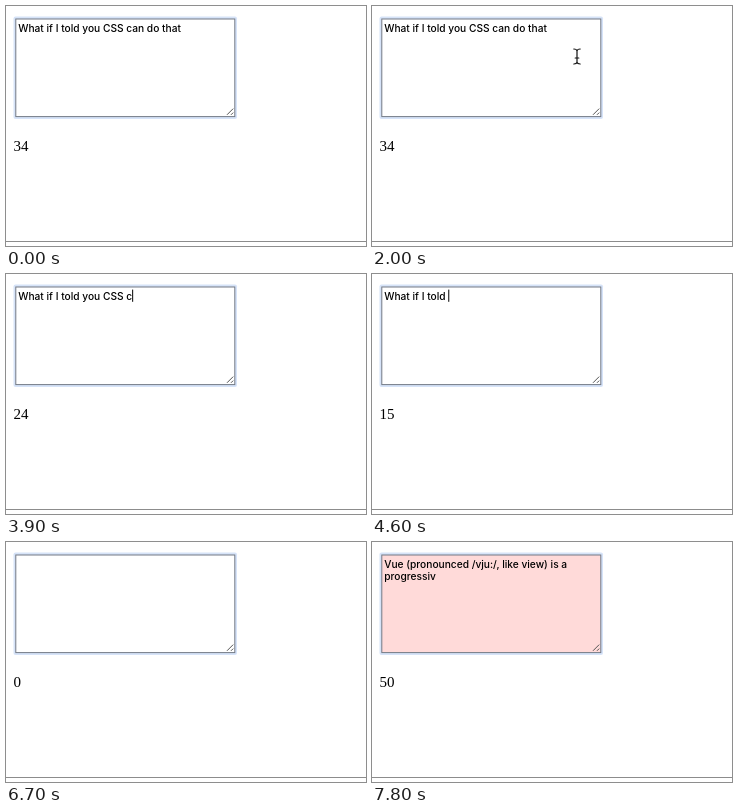
Write an HTML page that moves like this. It is 360 by 240 pixels and loops after 8000 ms.

```html
<!DOCTYPE html>
<html lang="en">
<head>
<meta charset="utf-8">
<title>Character counter</title>
<style>
  html, body { margin: 0; width: 100%; height: 100%; overflow: hidden; background: #fff; }
  svg { display: block; width: 360px; height: 240px; }
  .typed { font: 500 10.2px Inter, Roboto, sans-serif; white-space: pre; }
  .count { font: 15px "Liberation Serif", "Times New Roman", serif; }
  .grip { fill: none; stroke: #555; stroke-width: 1; }
  .beam { fill: none; stroke-linecap: round; }
</style>
</head>
<body>
<svg viewBox="0 0 360 240">
  <rect x="7.5" y="10.5" width="223.5" height="102.5" rx="2" fill="#d6e3f8"/>
  <rect id="field" x="9.8" y="13" width="219" height="97.6" fill="#fff" stroke="#747a85"/>
  <path class="grip" d="M221 108.8 227.2 102.6M225 108.8 227.2 106.6"/>
  <text id="line1" class="typed" x="12.2" y="26" xml:space="preserve"></text>
  <text id="line2" class="typed" x="12.2" y="38.2" xml:space="preserve"></text>
  <rect id="caret" width="1" height="12.2"/>
  <text id="count" class="count" x="7.5" y="145"></text>
  <g id="mouse" class="beam">
    <path id="beam" d="M-3.2-7Q-.3-7 0-5Q.3-7 3.2-7M0-5V6M-3.2 8Q-.3 8 0 6Q.3 8 3.2 8M-1.8 2H1.8" stroke="#fff" stroke-width="2.6"/>
    <use href="#beam"/>
    <path d="M-3.2-7Q-.3-7 0-5Q.3-7 3.2-7M0-5V6M-3.2 8Q-.3 8 0 6Q.3 8 3.2 8M-1.8 2H1.8" stroke="#111" stroke-width="1.2"/>
  </g>
  <path d="M0 235.5H360" stroke="#8c8c8c"/>
</svg>
<script>
  const LOOP = 8000;
  const FIRST = "What if I told you CSS can do that";
  const PASTED = ["Vue (pronounced /vju:/, like view) is a ", "progressiv"];
  const PASTE_AT = 7100;
  const REPEAT_MS = 1000 / 12;

  // Single key presses, before the key is held down
  const PRESSES = [2200, 2400, 2600, 2800, 2900, 3000, 3100, 3200];
  const HOLD_AT = 3765;

  const $ = id => document.getElementById(id);
  const [field, line1, line2, caret, count, mouse] =
    ["field", "line1", "line2", "caret", "count", "mouse"].map($);

  function textAt(t) {
    if (t >= PASTE_AT) return PASTED;
    let gone = PRESSES.filter(p => t >= p).length;
    if (t >= HOLD_AT) gone += 1 + Math.floor((t - HOLD_AT) / REPEAT_MS);
    return [FIRST.slice(0, Math.max(0, FIRST.length - gone)), ""];
  }

  function caretOn(t) {
    if (t < 2200) return Math.floor(t / 500) % 2 === 1;
    return t < 6700 || (t >= PASTE_AT && t < 7600);
  }

  function moveMouse(t) {
    const p = Math.min(1, Math.max(0, (t - 450) / 550));
    const e = p * p * (3 - 2 * p);
    mouse.setAttribute("transform", `translate(${46 + 159 * e} ${97 - 47 * e})`);
    mouse.style.display = t >= 500 && t < 2200 ? "" : "none";
  }

  function render(t) {
    const [a, b] = textAt(t);
    const last = b ? line2 : line1;
    line1.textContent = a;
    line2.textContent = b;
    count.textContent = a.length + b.length;
    field.setAttribute("fill", t >= PASTE_AT ? "#ffdad9" : "#fff");
    caret.setAttribute("x", 12.2 + (b || a ? last.getComputedTextLength() : 0));
    caret.setAttribute("y", b ? 27.8 : 15.6);
    caret.style.display = caretOn(t) ? "" : "none";
    moveMouse(t);
  }

  const start = performance.now();
  function tick() {
    render((performance.now() - start) % LOOP);
    requestAnimationFrame(tick);
  }
  tick();
</script>
</body>
</html>
```
